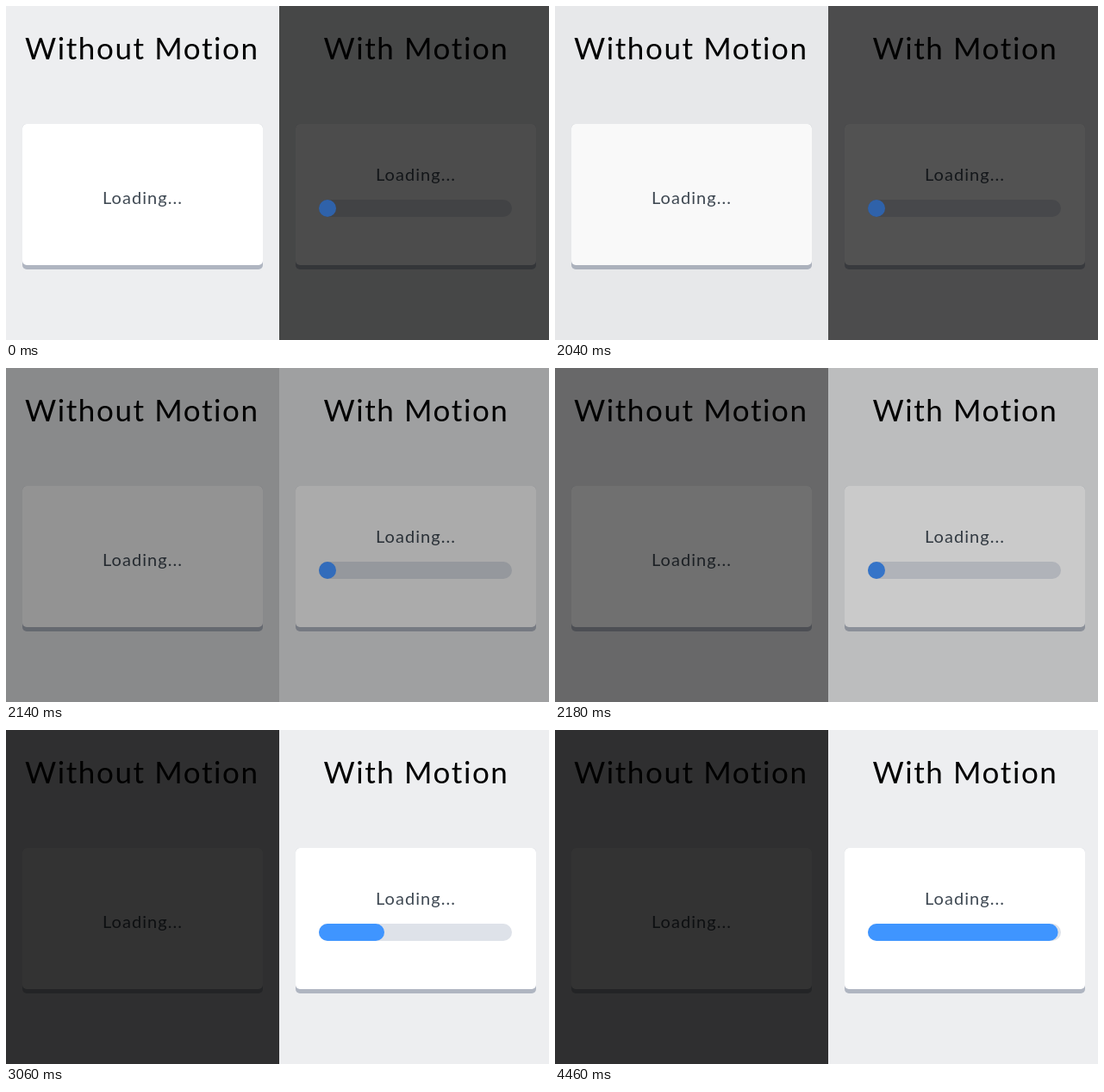
These frames come from a looping animation (630 by 388 pixels, 4.48 s). An HTML page:

```html
<!DOCTYPE html>
<html lang="en">
<head>
<meta charset="utf-8">
<title>Loading with and without motion</title>
<style>
  html, body { margin: 0; width: 100%; height: 100%; overflow: hidden; background: #edeef0; }
  svg { display: block; width: 630px; height: 388px; }
  text { font-family: Lato, sans-serif; }
  .title { font-size: 35px; letter-spacing: 1.6px; fill: #000; }
  .label { font-size: 20px; letter-spacing: 1.05px; fill: #3f4953; }
  .card { fill: #fff; }
  .edge { fill: #afb5c1; }
  .track { fill: #dee2e9; }

  .shade, .fill { animation: 4480ms linear infinite; }
  .shade.left { animation-name: darken; }
  .shade.right { animation-name: lighten; }
  .fill { animation-name: glow, grow; }

  /* The spotlight moves across from 2024 to 2404 ms */
  @keyframes darken {
    0% { opacity: 0; }
    45.179% { opacity: 0; animation-timing-function: ease; }
    53.661%, 100% { opacity: .8; }
  }
  @keyframes lighten {
    0% { opacity: .7; }
    45.179% { opacity: .7; animation-timing-function: ease; }
    53.661%, 100% { opacity: 0; }
  }
  @keyframes glow {
    0% { fill: #2f62aa; }
    45.179% { fill: #2f62aa; animation-timing-function: ease-in-out; }
    53.661%, 100% { fill: #3f95ff; }
  }
  /* The bar fills from 2540 ms and the loop cuts just before it is full */
  @keyframes grow {
    0% { width: 20px; }
    56.696% { width: 20px; animation-timing-function: cubic-bezier(.362, .094, .308, .881); }
    100% { width: 221px; }
  }
</style>
</head>
<body>
<svg viewBox="0 0 630 388">
  <defs>
    <g id="card">
      <rect class="edge" y="137" width="279" height="169" rx="5"/>
      <rect class="card" y="137" width="279" height="164" rx="5"/>
    </g>
  </defs>
  <rect width="630" height="388" fill="#edeef0"/>

  <text class="title" x="22" y="61.5">Without Motion</text>
  <use href="#card" x="19"/>
  <text class="label" x="112" y="229.5">Loading...</text>
  <rect class="shade left" width="317" height="388"/>

  <text class="title" x="368.5" y="61.5">With Motion</text>
  <use href="#card" x="336"/>
  <text class="label" x="429" y="202.5">Loading...</text>
  <rect class="track" x="363" y="225" width="224" height="20" rx="10"/>
  <rect class="shade right" x="317" width="313" height="388"/>
  <rect class="fill" x="363" y="225" width="20" height="20" rx="10"/>
</svg>
</body>
</html>
```
